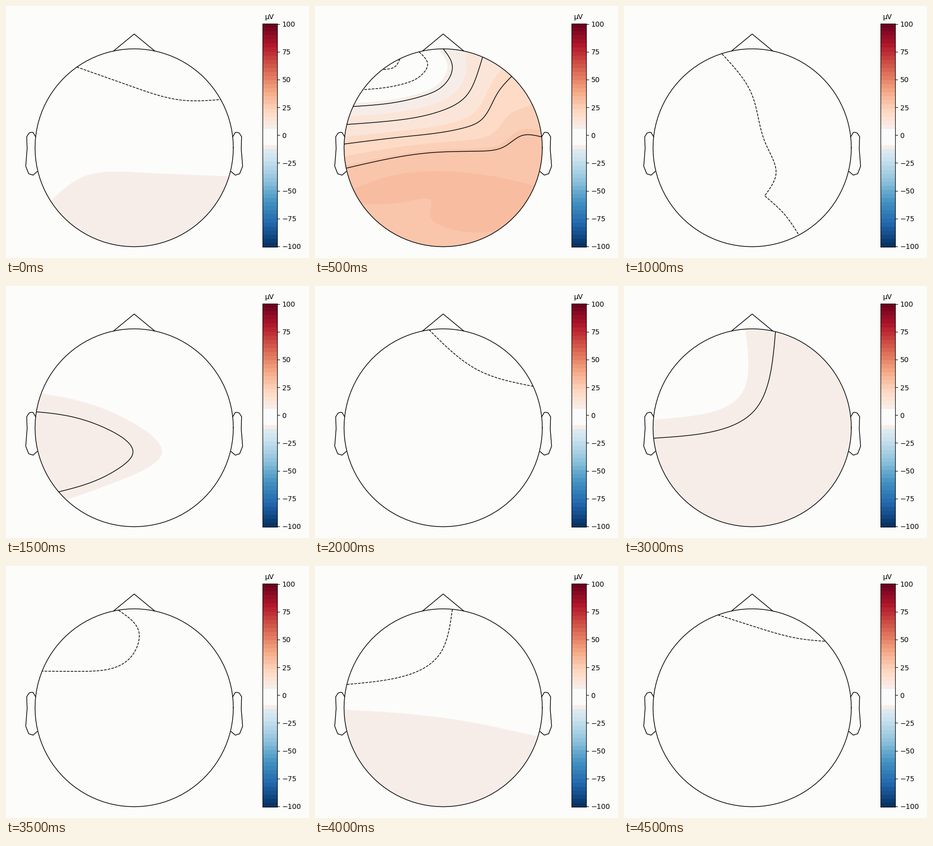
Write a matplotlib script that moves like this. It is 600 by 500 pixels and loops after 5000 ms.

```python
import numpy as np
import matplotlib.pyplot as plt
from matplotlib.animation import FuncAnimation
from matplotlib.patches import Circle

W, H, DPI = 600, 500, 100
CX, CY, R = 253.8, 281.3, 196.3
WHITE = (0.988, 0.988, 0.986)
PINK = (0.969, 0.929, 0.910)
BANDS, LIMIT = 55, 100.5

fig = plt.figure(figsize=(W / DPI, H / DPI), dpi=DPI, facecolor=WHITE)
ax = fig.add_axes([0, 0, 1, 1])
ax.set(xlim=(0, W), ylim=(H, 0))
ax.axis("off")
disc = Circle((CX, CY), R, transform=ax.transData)
shown = []


def shade(k):
    """Colour of band k, counted from the neutral middle."""
    if -2 <= k <= 1:
        return WHITE
    if k in (2, -3):
        return PINK
    return plt.cm.RdBu_r(0.5 + k / BANDS)[:3]


def smooth(keys, n=120):
    """Natural cubic spline through a few key points."""
    p = np.array(keys, float)
    h = np.hypot(*np.diff(p, axis=0).T)
    t = np.r_[0, np.cumsum(h)]
    a, b = np.eye(len(p)), np.zeros_like(p)
    for i in range(1, len(p) - 1):
        a[i, i - 1:i + 2] = h[i - 1], 2 * (h[i - 1] + h[i]), h[i]
        b[i] = 6 * ((p[i + 1] - p[i]) / h[i] - (p[i] - p[i - 1]) / h[i - 1])
    m = np.linalg.solve(a, b)
    s = np.linspace(0, t[-1], n)
    i = np.clip(np.searchsorted(t, s) - 1, 0, len(h) - 1)
    g = h[i][:, None]
    v = ((s - t[i]) / h[i])[:, None]
    u = 1 - v
    return (u * p[i] + v * p[i + 1]
            + g ** 2 / 6 * ((u ** 3 - u) * m[i] + (v ** 3 - v) * m[i + 1]))


def fill(color, *keys):
    """Fill from the curve out to the rim, closing counterclockwise."""
    c = smooth(keys)
    start, end = (np.arctan2(c[i, 1] - CY, c[i, 0] - CX) for i in (0, -1))
    if start > end:
        start -= 2 * np.pi
    a = np.linspace(end, start, 60)
    rim = np.c_[CX + 2 * R * np.cos(a), CY + 2 * R * np.sin(a)]
    area, = ax.fill(*np.vstack([c, rim]).T, color=color, lw=0, zorder=1)
    area.set_clip_path(disc)
    shown.append(area)


def line(*keys, style="-"):
    curve, = ax.plot(*smooth(keys).T, "k", ls=style, lw=1, zorder=2)
    curve.set_clip_path(disc)
    shown.append(curve)


def dash(*keys):
    line(*keys, style="--")


def back_glow():
    fill(PINK, (442, 338), (260, 330), (150, 340), (87, 388))
    dash((140, 121), (253, 161), (350, 187), (426, 185.5))


# Evenly spaced potential levels, front left to back right.
LEVELS = np.array([
    [(206, 91), (223, 115), (203, 143), (180, 153), (145, 161), (95, 166)],
    [(254, 85), (272, 120), (255, 157), (215, 178), (140, 194), (74, 199.5)],
    [(332, 101), (322, 133), (298, 180), (250, 208), (150, 228), (63, 235)],
    [(390, 139), (362, 172), (328, 227), (290, 243), (180, 259), (57, 274)],
    [(450, 260), (410, 257), (375, 279), (325, 288), (230, 291), (61, 322)],
])


def level(s):
    i = int(s)
    return LEVELS[i] + (s - i) * (LEVELS[i + 1] - LEVELS[i])


def strong_back():
    for s, k in (0.8, 2), (1.55, 3.5), (2.64, 5.5), (3.5, 6.6), (3.88, 7.6):
        fill(shade(k), *level(s))
    fill(shade(8.4), (435, 357), (370, 341), (260, 328), (150, 337),
         (78, 362))
    fill(shade(7.6), (362, 447), (260, 440), (227, 412), (231, 389),
         (180, 388), (88, 392))
    dash((168, 105), (160, 119), (133, 126))
    dash(*LEVELS[0])
    for keys in LEVELS[1:]:
        line(*keys)


def split():
    dash((194, 95), (253, 175), (280, 272), (301, 333), (279, 376))
    dash((279, 377), (320, 416), (346, 454))


def left_lobe():
    fill(PINK, (118, 425), (230, 384), (309, 330), (240, 265), (69, 213))
    line((104, 408.5), (220, 364), (251, 333), (190, 279), (59, 249.5))


def front_arc():
    dash((226, 87), (325, 168), (432, 199))


def right_lobe():
    fill(PINK, (222, 86), (300, 132), (365, 181), (428, 187))
    line((278, 86), (350, 136), (404, 153.5))
    dash((151, 115), (210, 214), (300, 285), (446, 326))


def wide_glow():
    fill(PINK, (240, 85), (235, 210), (58, 265))
    line((300, 90), (260, 245), (58, 302))


def front_left():
    dash((223, 88), (263, 130), (246, 182), (150, 209), (70, 208.5))


def low_glow():
    fill(PINK, (441, 338), (260, 302), (57, 285))
    dash((272, 86), (250, 170), (63, 235))


def front_edge():
    dash((186, 97), (270, 124), (350, 144.5), (400, 149.5))


def draw_head():
    a = np.linspace(0, 2 * np.pi, 101)
    ax.plot(CX + R * np.cos(a), CY - R * np.sin(a), "k", lw=1, zorder=3)
    tilt = np.radians(12)
    dx, dy = R * np.sin(tilt), R * np.cos(tilt)
    ax.plot([CX - dx, CX, CX + dx], [CY - dy, CY - 1.15 * R, CY - dy],
            "k", lw=1, zorder=3)
    ear = 2 * R * np.array([
        (.497, .0555), (.510, .0775), (.518, .0783), (.530, .0746),
        (.542, .0555), (.540, -.0055), (.547, -.0932), (.532, -.1313),
        (.510, -.1384), (.489, -.1199)])
    for side in (-1, 1):
        ax.plot(CX + side * ear[:, 0], CY - ear[:, 1], "k", lw=1, zorder=3)


def draw_bar():
    left, top, width, bottom = 507.8, 34.5, 29, 478
    bar = fig.add_axes([left / W, 1 - bottom / H, width / W,
                        (bottom - top) / H])
    half = BANDS // 2
    bands = np.array([[shade(k)] for k in range(-half, half + 1)])
    bar.imshow(bands, origin="lower", aspect="auto",
               interpolation="nearest", extent=(0, 1, -LIMIT, LIMIT))
    bar.set_xticks([])
    bar.yaxis.tick_right()
    bar.set_yticks(range(-100, 101, 25))
    bar.set_title("µV", fontsize=10)


draw_head()
draw_bar()
scenes = [back_glow, strong_back, split, left_lobe, front_arc, right_lobe,
          wide_glow, front_left, low_glow, front_edge]


def update(i):
    while shown:
        shown.pop().remove()
    scenes[i]()
    return []


anim = FuncAnimation(fig, update, frames=len(scenes), interval=500,
                     init_func=lambda: [], repeat=True, repeat_delay=0)
plt.show()
```
